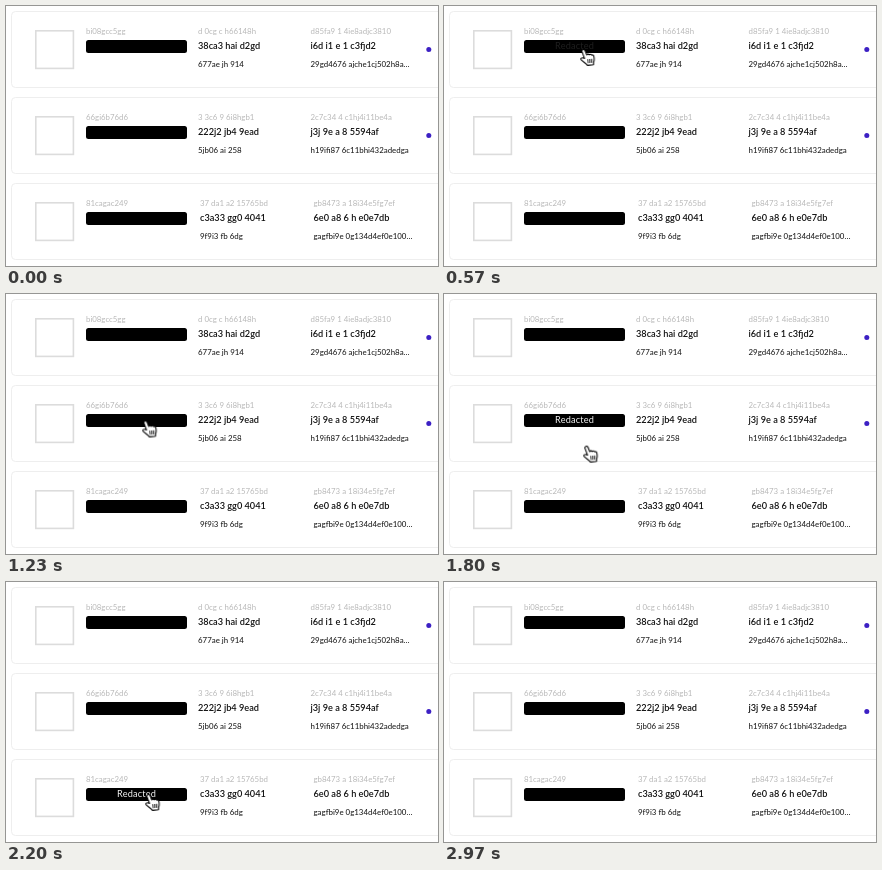
Write an HTML page that moves like this. It is 432 by 260 pixels and loops after 3.66 s.

```html
<!DOCTYPE html>
<html lang="en">
<head>
<meta charset="utf-8">
<title>Redacted list</title>
<style>
html, body { margin: 0; width: 100%; height: 100%; overflow: hidden; background: #fff; }
svg { display: block; width: 432px; height: 260px; font-family: Lato, "Open Sans", sans-serif; }
.card { fill: #fff; stroke: #eee; }
.box { fill: #fff; stroke: #dcdcdc; stroke-width: 1.6; }
.dot { fill: #3c20c4; }
.label { font-size: 7.85px; fill: #b8b8b8; }
.main { font-size: 9.2px; font-weight: 600; fill: #111; }
.sub { font-size: 7.9px; font-weight: 500; fill: #222; }
.tip { font-size: 9.2px; letter-spacing: .15px; fill: #f4f4f4; text-anchor: middle; opacity: 0; }
.tip, .cursor, .arrow, .hand { animation: 3660ms linear infinite; }
.tip0 { animation-name: tip0; }
.tip1 { animation-name: tip1; }
.tip2 { animation-name: tip2; }
.cursor { animation-name: move; }
.arrow { animation-name: arrow; }
.hand { animation-name: hand; }

@keyframes tip0 { 0%, 15% { opacity: 0 } 19.9%, 27.3% { opacity: 1 } 32.8%, 100% { opacity: 0 } }
@keyframes tip1 { 0%, 34.2% { opacity: 0 } 39%, 49.5% { opacity: 1 } 54.6%, 100% { opacity: 0 } }
@keyframes tip2 { 0%, 54.6% { opacity: 0 } 59.8%, 68.3% { opacity: 1 } 73.8%, 100% { opacity: 0 } }
@keyframes move {
  0%, 5.46% { transform: translate(228px, -38px); animation-timing-function: cubic-bezier(.455, .03, .515, .955) }
  14.48% { transform: translate(139.3px, 43px) }
  25.41% { transform: translate(139.3px, 43px); animation-timing-function: cubic-bezier(.455, .03, .515, .955) }
  33.61% { transform: translate(139.3px, 126.5px) }
  46.45% { transform: translate(139.3px, 126.5px); animation-timing-function: cubic-bezier(.55, .085, .68, .53) }
  49.18% { transform: translate(142.3px, 151px); animation-timing-function: cubic-bezier(.25, .46, .45, .94) }
  53.83%, 100% { transform: translate(142.3px, 212px) }
}
@keyframes arrow { 0%, 12.24% { opacity: 1 } 12.25%, 100% { opacity: 0 } }
@keyframes hand { 0%, 12.24% { opacity: 0 } 12.25%, 68.3% { opacity: 1 } 73.8%, 100% { opacity: 0 } }
</style>
</head>
<body>
<svg viewBox="0 0 432 260">
  <g id="rows"></g>
  <g class="cursor">
    <path class="arrow" d="M0 .5V15.8L3.6 12.4L6.1 18.2L8.7 17.1L6.2 11.4H11Z" fill="#000" stroke="#fff" stroke-width=".9"/>
    <g class="hand" stroke="#000" stroke-width="1.1" stroke-linejoin="round" stroke-linecap="round">
      <path fill="#fff" d="M1.2 9.4L-1.3 2.6C-1.9 .8 .9 -.3 1.7 1.5L3.4 5.9C3.9 4.9 5.6 4.8 6 5.9C6.7 5 8.2 5.1 8.5 6.2C9.3 5.6 10.2 6.1 10.5 7.3C11.1 9.4 11.1 11 10.4 13.2L10.2 15.8L4.2 16.4C3 14.5 .3 13.3 -1.8 11.2C-3.4 9.6 -1.6 7.9 1.2 9.4Z"/>
      <path fill="none" stroke-width=".9" d="M4.5 10.6l.5 3.2M6.5 10.4l.3 3.2M8.4 10.2l.1 3.2"/>
    </g>
  </g>
</svg>
<script>
const rows = [
  { label: ["bi08gcc5gg", "d 0cg c h66148h", "d85fa9 1 4ie8adjc3810"], main: ["38ca3 hai d2gd", "i6d i1 e 1 c3fjd2"],
    sub: ["677ae jh 914", "29gd4676 ajche1cj502h8a…"], x: [192, 304.5], dot: true },
  { label: ["66gi6b76d6", "3 3c6 9 6i8hgb1", "2c7c34 4 c1hj4i11be4a"], main: ["222j2 jb4 9ead", "j3j 9e a 8 5594af"],
    sub: ["5jb06 ai 258", "h19ifi87 6c11bhi432adedga"], x: [192, 304.5], dot: true },
  { label: ["81cagac249", "37 da1 a2 15765bd", "gb8473 a 18i34e5fg7ef"], main: ["c3a33 gg0 4041", "6e0 a8 6 h e0e7db"],
    sub: ["9f9i3 fb 6dg", "gagfbi9e 0g134d4ef0e100…"], x: [194, 307.5] }
];
const text = (cls, x, y, s) => `<text class="${cls}" x="${x}" y="${y}">${s}</text>`;

document.getElementById("rows").innerHTML = rows.map((r, i) => `
  <g transform="translate(0 ${i * 86})">
    <rect class="card" x="5.5" y="5.5" width="440" height="76" rx="4"/>
    <rect class="box" x="29.8" y="24.8" width="37.6" height="37.6"/>
    <rect x="80" y="34" width="101" height="13" rx="2.5"/>
    ${text("label", 80, 28, r.label[0])}
    ${text("tip tip" + i, 130.5, 43, "Redacted")}
    ${r.x.map((x, c) => text("label", x, 28, r.label[c + 1]) +
      text("main", x, 43, r.main[c]) + text("sub", x, 61, r.sub[c])).join("")}
    ${r.dot ? '<circle class="dot" cx="422.8" cy="43.5" r="2.5"/>' : ""}
  </g>`).join("");
</script>
</body>
</html>
```
